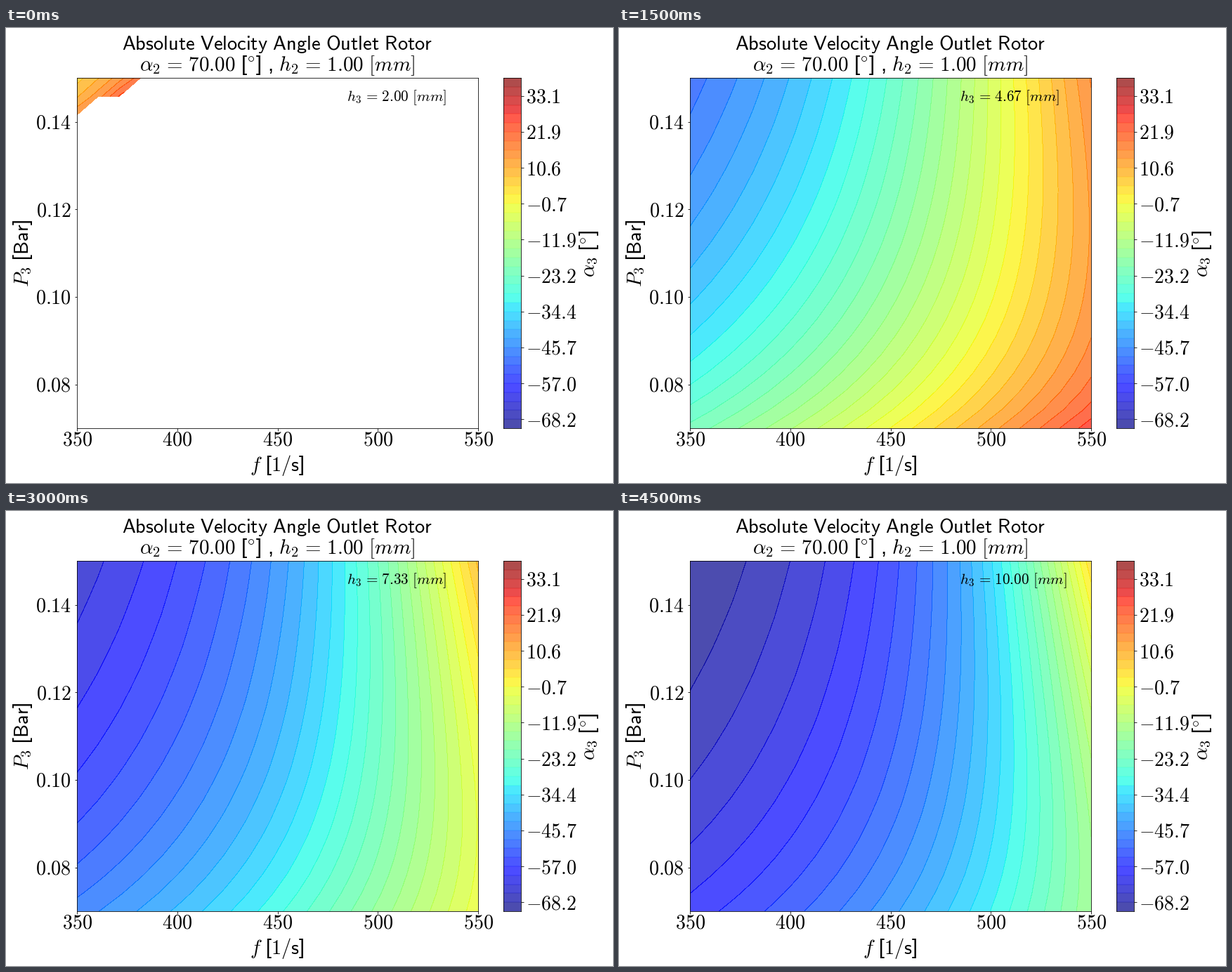
A matplotlib script for the animation above (5000 ms loop, 864 by 648 pixels).

```python
import numpy as np
import matplotlib as mpl
import matplotlib.pyplot as plt
from matplotlib.animation import FuncAnimation

W, H, DPI = 864, 648, 72
ALPHA, LINE = 0.7, 0.4
EQ = r"\hspace{0.13}=\hspace{0.13}"
mpl.rcParams.update({"mathtext.fontset": "cm", "font.size": 28,
                     "font.family": "Liberation Sans"})

freq = np.linspace(350, 550, 20)
pres = np.linspace(0.07, 0.15, 20)
heights = np.linspace(2, 10, 10)
levels = np.linspace(-71.035, 38.75, 40)
F, P = np.meshgrid(freq, pres)


def outlet_angle(h):
    """Absolute flow angle behind the rotor; masked where no flow exists."""
    x = F / 350 - 1
    rho = (P / 0.15) ** 0.94
    blade = 0.2275 * rho * (x + 1)
    energy = 0.2788 - 0.286 * x + 0.0515 * x**2 - 0.104 * np.log(P / 0.15)
    swirl2 = rho**2 * energy - 1 / h**2
    swirl = np.sqrt(np.maximum(swirl2, 0))
    angle = np.degrees(np.arctan((blade - swirl) * h))
    angle = np.clip(angle, levels[0] + 1e-6, levels[-1] - 1e-6)
    return np.ma.masked_where(swirl2 < 0, angle)


def sans(text):
    return r"$\mathsf{" + text.replace(" ", r"\ ") + "}$"


def label(x, y, text, size=28.5, ha="center", **kw):
    return fig.text(x / W, 1 - y / H, text, size=size, ha=ha,
                    va="baseline", **kw)


def side_label(x, y, text):
    label(x, y, text, rotation=90, rotation_mode="anchor")


def box(x0, y0, x1, y1):
    return fig.add_axes([x0 / W, 1 - y1 / H, (x1 - x0) / W, (y1 - y0) / H])


fig = plt.figure(figsize=(W / DPI, H / DPI), dpi=DPI, facecolor="white")
ax = box(101, 71.2, 672.3, 570)
ax.set(xlim=(350, 550), ylim=(0.07, 0.15))
ax.set_xticks(range(350, 551, 50), [f"${v}$" for v in range(350, 551, 50)])
ticks = [0.08, 0.10, 0.12, 0.14]
ax.set_yticks(ticks, [f"${v:.2f}$" for v in ticks])
ax.tick_params(axis="x", pad=1)
ax.tick_params(axis="y", pad=4.5)

bar = box(708.4, 71.2, 733.3, 570)
mids = (levels[:-1] + levels[1:]) / 2
style = dict(cmap="jet", alpha=ALPHA)
bar.pcolormesh([0, 1], levels, mids[:, None], vmin=levels[0], vmax=levels[-1], **style)
bar.hlines(levels[1:-1], 0, 1, lw=LINE, alpha=ALPHA,
           colors=plt.get_cmap("jet")(np.linspace(0, 1, 40)[1:-1]))
bar.set(xlim=(0, 1), ylim=(levels[0], levels[-1]), xticks=[])
bar.yaxis.tick_right()
bar.set_yticks(levels[1::4], [f"${v:.1f}$" for v in levels[1::4]])
bar.tick_params(axis="y", pad=3)

degree = r"[$^{\circ}$]"
label(386, 31, sans("Absolute Velocity Angle Outlet Rotor"), 28.4)
label(386, 61.5, rf"$\alpha_2{EQ}$" + sans("70.00 ") + degree + sans(" ") + ","
      + sans(" ") + f"$h_2{EQ}$" + sans("1.00 ") + "$[mm]$", 29)
label(386, 631, "$f$" + sans(" ") + "[" + sans("1/s") + "]")
side_label(32, 321, "$P_3$" + sans(" ") + "[" + sans("Bar") + "]")
side_label(838, 321, r"$\alpha_3$" + sans(" ") + degree)
note = label(485, 104, "", 21.2, "left")

drawn = []


def update(i):
    while drawn:
        drawn.pop().remove()
    h = heights[i]
    z = outlet_angle(h)
    span = dict(levels=levels, vmin=levels[0], vmax=levels[-1], **style)
    drawn.append(ax.contourf(F, P, z, **span))
    drawn.append(ax.contour(F, P, z, linewidths=LINE, linestyles="solid", **span))
    note.set_text(f"$h_3{EQ}$" + sans(f"{h:.2f} ") + "$[mm]$")


anim = FuncAnimation(fig, update, frames=len(heights), init_func=lambda: None,
                     interval=500, repeat=True)
plt.show()
```
